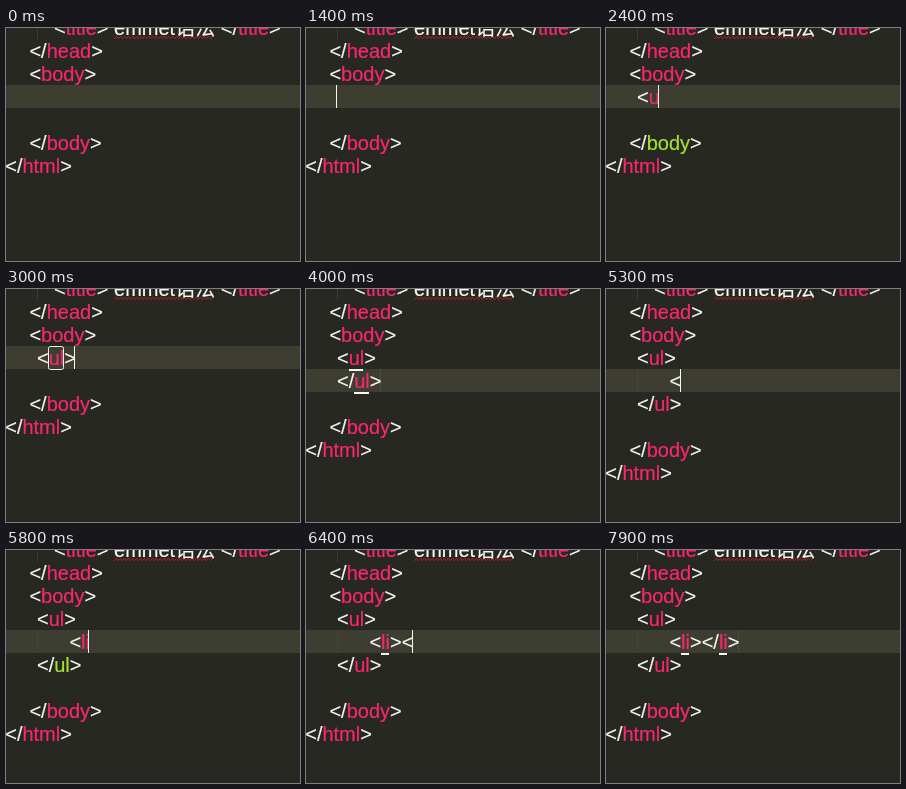
An HTML page for the animation above (8 s loop, 294 px wide and 233 px high).

```html
<!DOCTYPE html>
<html lang="en">
<head>
<meta charset="utf-8">
<title>Typing a list in an editor</title>
<style>
  html, body { margin: 0; width: 100%; height: 100%; overflow: hidden; background: #272822; }
  svg { display: block; width: 294px; height: 233px; }
  text {
    font: 20px "Liberation Sans", Arial, "Noto Sans CJK SC", "Noto Sans CJK", sans-serif;
    fill: #f8f8f2; stroke: #f8f8f2; stroke-width: 0.2; white-space: pre;
  }
  .tag { fill: #f92672; stroke: #f92672; }
  .attr { fill: #a6e22e; stroke: #a6e22e; }
</style>
</head>
<body>
<svg id="stage" viewBox="0 0 294 233"></svg>
<script>
const LOOP = 8000, ROW = 23, TOP = 57;
const OUTER = -1.8, INNER = 22.4, LIST = 30, ITEM = 62.4;
const stage = document.getElementById('stage');
const pen = document.createElement('canvas').getContext('2d');
pen.font = '20px "Liberation Sans", Arial, sans-serif';
const width = s => pen.measureText(s).width;

// Each step changes part of the state: lines [x, text], active line, caret opacity, marked tags.
const ul = [LIST, '<ul>'], end = [LIST, '</ul>'];
const item = text => [ul, [ITEM, text], end];
const DIM = 0.08;
const steps = [
  [0, { lines: [[OUTER, '']], active: 0, caret: 0, under: [], box: false, open: false }],
  [1400, { lines: [[LIST, '']], caret: 1 }],
  [1800, { caret: DIM }],
  [1900, { caret: 0 }],
  [2200, { lines: [[LIST, '<']], caret: 1 }],
  [2400, { lines: [[LIST, '<u']], open: true }],
  [2600, { lines: [[LIST, '<ul']] }],
  [2900, { lines: [ul], open: false }],
  [3000, { box: true }],
  [3100, { lines: [ul, [LIST, '']], active: 1 }],
  [3400, { lines: [ul, [LIST, '<']] }],
  [3500, { lines: [ul, end] }],
  [3900, { caret: DIM, under: [0, 1], box: false }],
  [4100, { active: 0, caret: 1 }],
  [4400, { lines: [ul, [LIST, ''], end], active: 1, under: [0, 2] }],
  [4700, { lines: item('') }],
  [4900, { under: [] }],
  [5100, { caret: DIM }],
  [5200, { caret: 0 }],
  [5300, { lines: item('<'), caret: 1 }],
  [5500, { lines: item('<l'), open: true }],
  [5800, { lines: item('<li') }],
  [6000, { lines: item('<li>'), open: false }],
  [6200, { under: [1] }],
  [6400, { lines: item('<li><') }],
  [6500, { lines: item('<li></li>') }],
  [6700, { under: [1, 1.5] }],   // .5 marks the closing tag on the line
  [6900, { caret: DIM }],
  [7000, { caret: 0 }],
  [7400, { caret: DIM }],
  [7500, { caret: 1 }],
  [7900, { caret: DIM }]
];

const rect = (x, y, w, h, extra) => `<rect x="${x}" y="${y}" width="${w}" height="${h}" ${extra}/>`;
const guide = (y, h) => `<path d="M31.5 ${y}v${h}" stroke="#4a4a42" stroke-dasharray="1 1"/>`;

function line(x, row, text, kind = 'tag') {
  const body = text.replace(/(<\/?)(\w*)|>/g, (all, bracket, name) => bracket
    ? bracket.replace('<', '&lt;') + (name ? `<tspan class="${kind}">${name}</tspan>` : '')
    : '&gt;');
  return `<text x="${x + 1}" y="${TOP + 19 + row * ROW}">${body}</text>`;
}

// Left and right edge of the nth tag name on a line
function nameSpan([x, text], nth) {
  const m = [...text.matchAll(/(<\/?)(\w+)/g)][nth];
  const left = x + width(text.slice(0, m.index) + m[1]);
  return [Math.round(left) + 1, Math.round(left + width(m[2]))];
}

function squiggle() {
  const dots = (x, y) => `<path d="M${x} ${y}H207" stroke="#b81c1c" stroke-dasharray="1 3"/>`;
  return dots(108, 10.5) + dots(109, 9.5) + dots(110, 8.5) + dots(111, 9.5);
}

function draw(s) {
  const last = s.lines.length + 1;
  const kindOf = i => s.open && i === s.active + 1 ? 'attr' : 'tag';
  let out = rect(0, TOP + s.active * ROW, 294, ROW, 'fill="#3e3d32"') + guide(0, 11) + squiggle();
  out += line(47, -3, '<title> emmet语法 </title>') + line(INNER, -2, '</head>') + line(INNER, -1, '<body>');
  s.lines.forEach(([x, text], i) => {
    if (x === ITEM) out += guide(TOP + i * ROW, ROW);
    out += line(x, i, text, kindOf(i));
  });
  out += line(INNER, last, '</body>', s.open && s.lines.length === 1 ? 'attr' : 'tag');
  out += line(OUTER, last + 1, '</html>');

  for (const mark of s.under) {
    const i = Math.floor(mark);
    const [a, b] = nameSpan(s.lines[i], mark > i ? 1 : 0);
    out += rect(a, TOP + (i + 1) * ROW, b - a, 2, 'fill="#f8f8f2"');
  }
  if (s.box) {
    const [a, b] = nameSpan(s.lines[0], 0);
    out += rect(a - 0.5, TOP + 0.5, b - a + 1, ROW, 'rx="2" fill="none" stroke="#f8f8f2"');
  }
  const [x, text] = s.lines[s.active];
  out += rect(Math.floor(x + width(text)), TOP + s.active * ROW, 1, ROW, `fill="#f8f8f2" opacity="${s.caret}"`);
  stage.innerHTML = out;
}

let shown = -1;
function tick() {
  const t = performance.now() % LOOP;
  const past = steps.filter(([at]) => at <= t);
  if (past.length !== shown) {
    shown = past.length;
    draw(Object.assign({}, ...past.map(([, change]) => change)));
  }
  requestAnimationFrame(tick);
}
tick();
</script>
</body>
</html>
```
